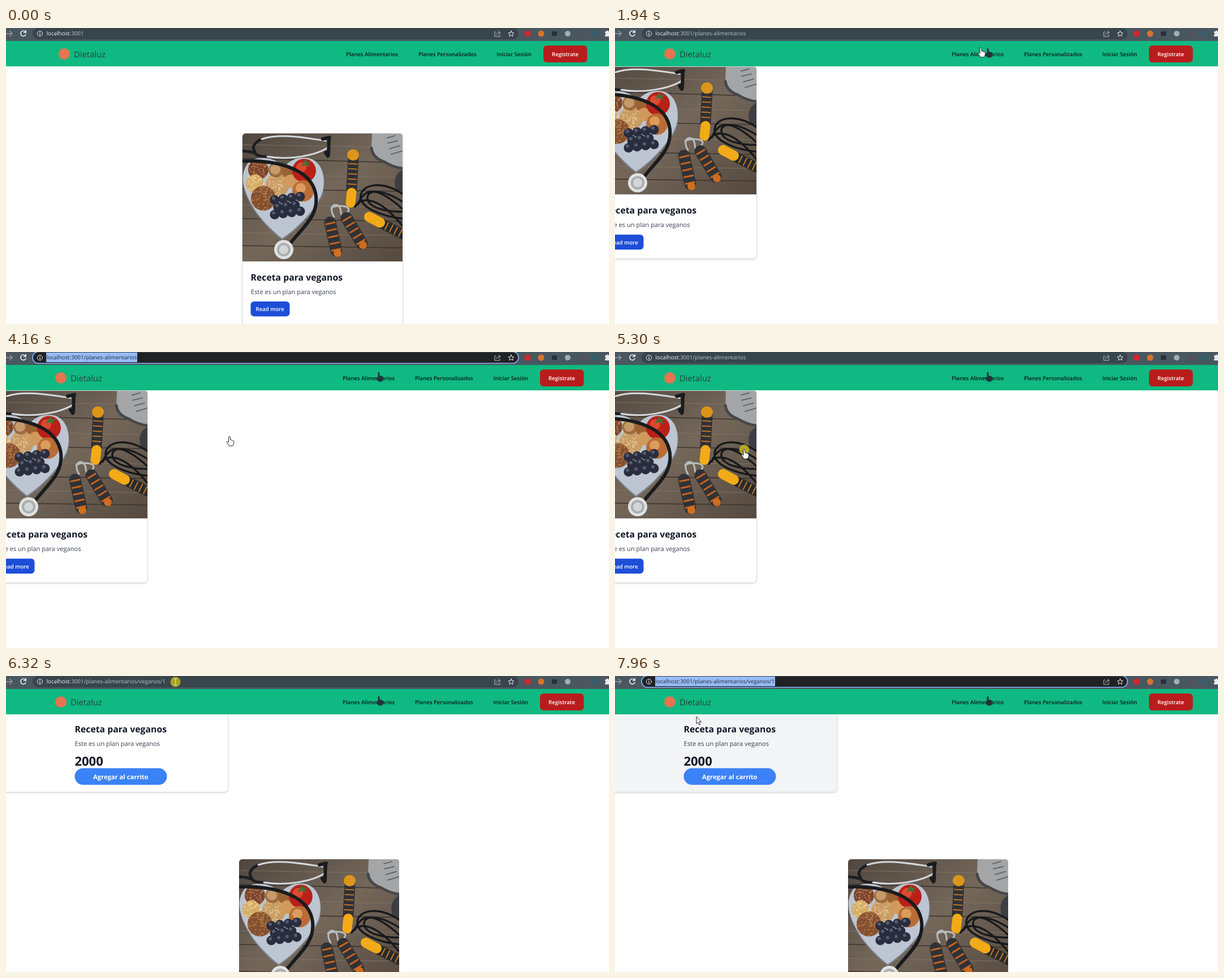
An HTML page for the animation above (8 s loop, 1066 px wide and 525 px high).

```html
<!DOCTYPE html>
<html lang="es">
<head>
<meta charset="utf-8">
<title>Planes alimentarios</title>
<style>
  html, body { margin: 0; width: 100%; height: 100%; overflow: hidden; background: #fff; }
  svg { display: block; width: 100%; height: 100%; }
  text { font-family: "Open Sans", "Noto Sans", sans-serif; text-rendering: geometricPrecision; white-space: pre; }
  .url { font-size: 9.8px; }
  .link { font-size: 9.6px; font-weight: 600; fill: #0b1a1c; }
  .title { font-size: 15.8px; font-weight: 700; fill: #111827; }
  .body { font-size: 11.15px; fill: #374151; }
  .button { font-size: 9.65px; font-weight: 600; fill: #fff; }
  .line { fill: none; stroke-linecap: round; stroke-linejoin: round; }
  .card { fill: #fff; stroke: #e5e7eb; filter: drop-shadow(0 1px 1.5px rgba(0, 0, 0, .2)); }
</style>
</head>
<body>
<svg viewBox="0 0 1066 525">
  <defs>
    <clipPath id="photoClip"><path d="M0 227V6Q0 0 6 0H277Q283 0 283 6V227Z"/></clipPath>
    <clipPath id="selectionClip"><rect id="clipRect" y="1" height="17"/></clipPath>
    <linearGradient id="wood" x2="1" y2="1">
      <stop stop-color="#50473f"/><stop offset=".5" stop-color="#74675a"/><stop offset="1" stop-color="#55493f"/>
    </linearGradient>
    <path id="handShape" d="M-1.5 1C-1.5-.5 1.5-.5 1.5 1V6C3 5.3 4.3 6 4.3 7C6 6.3 7 7 7 8C8 8 8.3 8.8 8 10L7.5 13L6 16.5H-.5L-4.5 10.5C-5.5 9-4 8-2.8 9L-1.5 10.3Z"/>

    <g id="photo" clip-path="url(#photoClip)">
      <rect width="283" height="227" fill="url(#wood)"/>
      <path class="line" stroke="#3b332d" stroke-width="1.5" d="M0 44L283 52M0 98L283 103M0 151L283 156M0 199L283 203"/>
      <path class="line" stroke="#85786b" stroke-width=".8" d="M0 20L283 25M0 73L283 78M0 127L283 130M0 176L283 181"/>
      <!-- shoes -->
      <path fill="#a3a5a6" d="M229 0H283V64Q264 62 250 52Q229 44 228 28Z"/>
      <path class="line" stroke="#45474b" stroke-width="5" d="M228 26Q230 43 250 50Q266 60 283 62"/>
      <path class="line" stroke="#65686b" stroke-width="2" d="M256 8L270 4M257 17L274 13M260 27L278 22M263 37L283 31"/>
      <path fill="#3c3e43" d="M283 64Q263 76 272 101L283 110Z"/>
      <!-- heart plate with food -->
      <path fill="#7b828c" d="M72 65C60 42 20 42 8 58C-8 83 5 113 25 143C40 163 55 177 70 189C95 173 130 138 142 108C150 78 140 52 118 47C95 42 80 53 72 65Z"/>
      <path fill="#bcc5d1" d="M72 62C60 39 20 38 8 55C-8 80 5 110 25 140C40 160 55 174 70 186C95 170 130 135 141 105C149 75 139 49 118 44C95 40 80 50 72 62Z"/>
      <g id="food"></g>
      <path fill="#447136" d="M108 50l4-4 2 5 9-1-7 4 3 6-8-4-8 2 4-5Z"/>
      <!-- stethoscope -->
      <g class="line">
        <path stroke="#191b1e" stroke-width="6" d="M0 49C36 48 72 52 100 68C137 90 136 128 119 153C108 169 96 180 83 197"/>
        <path stroke="#1c1e21" stroke-width="5" d="M0 31Q14 32 22 35Q28 42 44 41M22 33Q13 20 34 10"/>
        <path stroke="#d5d9dc" stroke-width="3" d="M34 10C66-1 112 8 147 13M44 41C82 48 130 39 151 25"/>
        <path stroke="#191b1e" stroke-width="6" d="M142 10L154 7M147 34L151 40M153 8L152 38"/>
      </g>
      <circle cx="73" cy="206" r="17" fill="#e0e2e2"/><circle cx="73" cy="206" r="12" fill="#a9adaf"/><circle cx="73" cy="206" r="8" fill="#d3d6d6"/>
      <!-- rope and handles -->
      <g class="line">
        <path stroke="#17191b" stroke-width="3.5" d="M283 107C244 82 211 91 209 111S245 147 283 151M283 121C248 99 220 98 221 115S255 139 283 139M204 126C216 95 239 94 283 134M199 130C211 110 242 113 283 164"/>
        <path stroke="#b8bdbd" stroke-width="3" d="M162 148C148 124 173 119 174 139C176 155 181 144 187 138C193 128 169 126 157 132"/>
      </g>
      <g id="handles"></g>
    </g>

    <g id="cardContent">
      <rect class="card" x="418" y="187.500" width="283" height="340" rx="6"/>
      <use href="#photo" x="418" y="187"/>
      <text class="title" x="432.500" y="447.500">Receta para veganos</text>
      <text class="body" x="433" y="471.500">Este es un plan para veganos</text>
      <rect x="432.500" y="485" width="69" height="26.500" rx="6" fill="#1d4ed8"/>
      <text class="button" x="441.500" y="502">Read more</text>
    </g>
  </defs>

  <rect width="1066" height="525" fill="#fff"/>
  <use id="recipe" href="#cardContent"/>
  <g id="product">
    <rect id="productCard" class="card" x="-10" y="67" width="402.500" height="138.500" rx="6"/>
    <text class="title" x="121.500" y="99.500">Receta para veganos</text>
    <text class="body" x="121.500" y="123.500">Este es un plan para veganos</text>
    <text class="title" x="121.500" y="159" style="font-size:22px">2000</text>
    <rect x="121.500" y="163.500" width="163" height="29.500" rx="14.750" fill="#3b82f6"/>
    <text class="button" x="154" y="182.500" style="font-size:11.2px;font-weight:700">Agregar al carrito</text>
    <use href="#photo" x="412" y="325"/>
  </g>

  <rect y="23" width="1066" height="45" fill="#10b981"/>
  <g id="nav">
    <circle cx="103" cy="46" r="10" fill="#e57550"/>
    <text x="120" y="52" font-size="14.800" fill="#24413e">Dietaluz</text>
    <text class="link" x="601" y="49.500">Planes Alimentarios</text>
    <text class="link" x="729" y="49.500">Planes Personalizados</text>
    <text class="link" x="867.500" y="49.500">Iniciar Sesión</text>
    <rect x="950" y="31" width="77.500" height="30" rx="6" fill="#b91c1c"/>
    <text class="button" x="965" y="49.500">Registrate</text>
  </g>
  <use id="trace" href="#handShape" x="659" y="36" fill="#20343a"/>

  <rect width="1066" height="23" fill="#495761"/>
  <rect id="omnibox" x="47" y="-.5" width="859" height="20.500" rx="10.250" stroke-width="1.600"/>
  <g class="line" stroke="#e8eaed" stroke-width="1.300">
    <path stroke="#98a1a7" d="M0 10H11M6.500 5.500L11 10L6.500 14.500"/>
    <path stroke-width="1.700" d="M34.500 7A4.700 4.700 0 1 0 35 11.500M35.200 4.500V8H31.500"/>
    <circle cx="60" cy="10" r="4.600" stroke-width="1"/><path d="M60 9.500V12.300M60 7.400V7.500"/>
    <path stroke="#b7bec2" stroke-width="1" d="M866 7H864V15H873V12M867 12Q867 8 873 8M870.500 5L874 8L870.500 11"/>
    <path stroke-width="1" d="M893 5L894.500 8.400L898 8.700L895.300 11L896.200 14.600L893 12.700L889.800 14.600L890.700 11L888 8.700L891.500 8.400Z"/>
  </g>
  <circle cx="922" cy="10" r="5.500" fill="#d6262b"/>
  <circle cx="946" cy="10" r="5.500" fill="#d9742c"/>
  <rect x="965" y="6" width="9" height="8" fill="#26323b"/>
  <circle cx="993" cy="10" r="5" fill="#a4adb2"/>
  <circle cx="1017" cy="10" r="5" fill="#554f59"/>
  <rect x="1036" y="5" width="10" height="10" fill="#315f6c"/>
  <path fill="#e8eaed" d="M1059 6H1061.500A1.800 1.800 0 0 1 1065 6H1066V15H1059V12A1.700 1.700 0 0 0 1059 8.700Z"/>
  <text class="url" x="71.500" y="13.400" fill="#f1f3f4">localhost<tspan id="path" fill="#b9c1c5"></tspan></text>
  <g clip-path="url(#selectionClip)">
    <rect x="71" y="1" width="212" height="17" fill="#97bcf5"/>
    <text id="selectedUrl" class="url" x="71.500" y="13.400" fill="#202a38"></text>
  </g>
  <path id="caret" d="M232.500 3V16" stroke="#f1f3f4"/>

  <g id="pointer">
    <circle id="click" r="9" fill="#d9cc16" opacity=".7"/>
    <use id="hand" href="#handShape" fill="#fff" stroke="#111" stroke-width=".9"/>
    <path id="arrow" d="M0 0V12.500L2.800 10L4.800 14.800L6.800 14L4.800 9.400H8.500Z" fill="#fff" stroke="#111" stroke-width=".9"/>
    <path id="beam" class="line" d="M-2.500-6Q0-6 0-4Q0-6 2.500-6M0-4V4M-2.500 6Q0 6 0 4Q0 6 2.500 6" stroke="#e3e3dc"/>
  </g>
</svg>

<script>
const LOOP = 8000, STEP = 70;
const $ = id => document.getElementById(id);
const show = (id, on) => $(id).setAttribute('visibility', on ? 'visible' : 'hidden');
const set = (id, attrs) => Object.entries(attrs).forEach(([k, v]) => $(id).setAttribute(k, v));
const within = (t, a, b) => t >= a && t < b;

let seed = 7;
const random = () => (seed = seed * 16807 % 2147483647) / 2147483647;
const disc = (x, y, r, fill) => `<circle cx="${x}" cy="${y}" r="${r}" fill="${fill}"/>`;

function grains(x, y, r, base, dot) {
  let out = disc(x, y, r, base);
  for (let i = 0; i < r * 3; i++) {
    const a = random() * 2 * Math.PI, d = Math.sqrt(random()) * r;
    out += disc(x + d * Math.cos(a), y + d * Math.sin(a), 1.3, dot);
  }
  return out;
}

function grapes() {
  let out = '';
  for (let row = 0; row < 3; row++)
    for (let i = 0; i < 4 - row % 2; i++) {
      const x = 57 + i * 15 + row % 2 * 6, y = 118 + row * 13 - i * 2;
      out += disc(x, y, 8.5, '#292d3d') + disc(x - 2, y - 3, 3, '#555b71');
    }
  return out;
}

function handle(x1, y1, x2, y2, width, color, stripe, dash) {
  const line = `<path class="line" d="M${x1} ${y1}L${x2} ${y2}"`;
  return `${line} stroke="${color}" stroke-width="${width}"/>` +
    (stripe ? `${line} style="stroke-linecap:butt" stroke="${stripe}" stroke-width="${width * .85}" stroke-dasharray="${dash}"/>` : '');
}

$('food').innerHTML =
  grains(28, 64, 18, '#7b442c', '#b2764a') + grains(22, 89, 16, '#d4ad68', '#edcd91') +
  grains(62, 91, 21, '#c89c63', '#e3c18e') + grains(37, 115, 22, '#85502f', '#b17b4b') +
  disc(59, 65, 13, '#9c6c43') + disc(58, 64, 9, '#c69b6a') + disc(80, 68, 11, '#9c6232') +
  disc(85, 85, 12, '#d19a5c') + disc(109, 66, 21, '#b92018') + disc(104, 60, 9, '#dd4930') +
  disc(107, 102, 19, '#b96c35') + disc(103, 97, 9, '#dc9c5b') + grapes();

$('handles').innerHTML =
  handle(196, 44, 193, 98, 19, '#303034', '#bd7628', '2 7') +
  handle(195, 38, 196, 38, 20, '#dc951b') + handle(193, 105, 191, 123, 17, '#f3aa17') +
  handle(155, 158, 166, 208, 21, '#303236', '#c96420', '3 9') +
  handle(184, 150, 211, 195, 21, '#303236', '#c96420', '3 9') +
  handle(246, 160, 290, 182, 18, '#292a2d', '#c47d22', '2 7') +
  handle(224, 148, 243, 158, 18, '#f2aa18') + disc(168, 212, 7, '#cf7020') + disc(213, 198, 7, '#ce6b20');

// Pointer moves: start, end, target x, target y.
const moves = [
  [230, 850, 666, 28], [920, 990, 661, 33], [1060, 1200, 659, 36],
  [1940, 2500, 297, 11], [2780, 3270, 30, 11],
  [3670, 4090, 395, 150], [4560, 4561, 396, 149], [4760, 5030, 228.5, 173],
  [5630, 6250, 299.500, 10.500], [6460, 7080, 64, 20], [7340, 7960, 144, 72]
];
const clicks = [[1400, 1470], [2570, 3670], [5300, 5430], [6320, 7340]];

function pointerAt(t) {
  let x = 948, y = 451;
  for (const [start, end, toX, toY] of moves) {
    if (t < start) break;
    const steps = Math.floor((end - start) / STEP) + 1;
    const p = Math.min(1, (Math.floor((t - start) / STEP) + 1) / steps);
    const ease = p * p * (3 - 2 * p);
    x += (toX - x) * ease;
    y += (toY - y) * ease;
  }
  return { x, y };
}

function draw(t) {
  const { x, y } = pointerAt(t);
  const page = t < 1540 ? 0 : t < 5430 ? 1 : 2;
  const route = t < 1470 ? '' : '/planes-alimentarios' + (page === 2 ? '/veganos/1' : '');
  const pressed = clicks.some(([a, b]) => within(t, a, b));
  const focused = within(t, 2640, 5300) || t >= 6390;
  const textEnd = page === 2 ? 283 : 232;

  show('recipe', page < 2);
  show('product', page === 2);
  set('recipe', { transform: page ? 'translate(-451 -118.5)' : '' });
  set('nav', { transform: page ? 'translate(-6 0)' : '' });
  show('trace', t >= 1940);
  $('productCard').style.fill = x < 393 && y > 68 && y < 206 ? '#f3f4f6' : '#fff';

  $('path').textContent = ':3001' + route;
  $('selectedUrl').textContent = 'localhost:3001' + route;
  set('omnibox', { fill: focused ? '#202124' : '#38454d', stroke: focused ? '#8ab4f8' : 'none' });

  const selecting = within(t, 2780, 5300) || t >= 6460;
  const dragging = within(t, 2780, 3670) || within(t, 6460, 7340);
  const from = !selecting ? textEnd : dragging ? Math.min(textEnd, Math.max(71, x)) : 71;
  set('clipRect', { x: from, width: textEnd - from });
  show('caret', focused && from === textEnd);
  set('caret', { transform: `translate(${textEnd - 232} 0)` });

  const onLink = y > 30 && y < 58 && x > 595 && x < 694 || within(t, 4090, 5630);
  const kind = t < 230 ? '' : dragging || y < 21 && x > 62 ? 'beam' : onLink ? 'hand' : 'arrow';
  for (const id of ['hand', 'arrow', 'beam']) show(id, id === kind);
  show('click', pressed);
  set('pointer', { transform: `translate(${x} ${y})` });
}

const began = performance.now();
(function frame() {
  draw((performance.now() - began) % LOOP);
  requestAnimationFrame(frame);
})();
</script>
</body>
</html>
```
